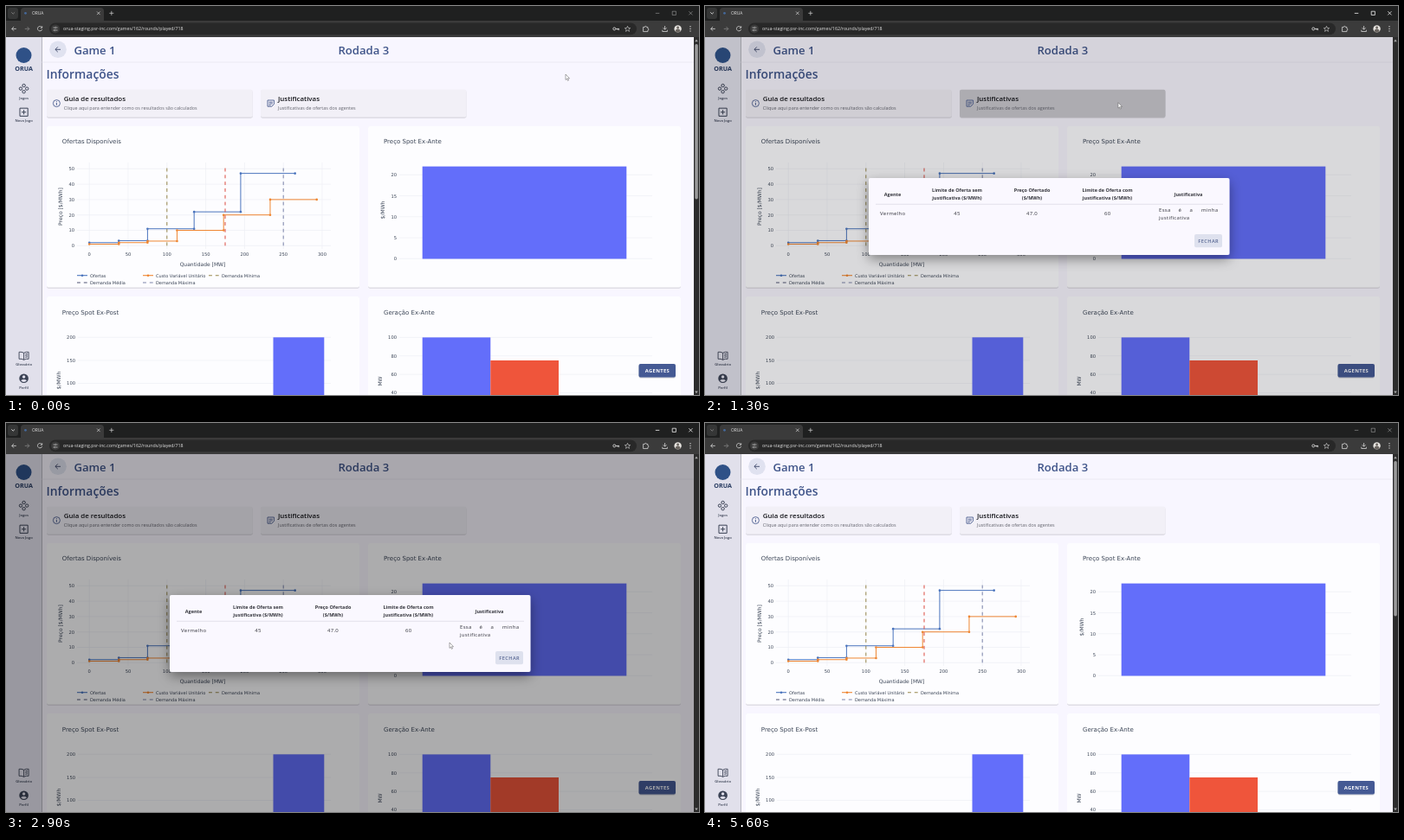
An HTML page that plays this animation: 800 by 450 pixels, repeating every 5.7 s.

```html
<!DOCTYPE html>
<html lang="pt">
<head>
<meta charset="utf-8">
<style>
html, body { margin: 0; width: 100%; height: 100%; overflow: hidden; background: #1f2020; }
svg { display: block; width: 800px; height: 450px; font-family: "Open Sans", "Noto Sans", sans-serif; }
.plot { font-family: "DejaVu Sans", sans-serif; fill: #3c4657; }
</style>
</head>
<body>
<svg id="stage" viewBox="0 0 800 450" xmlns="http://www.w3.org/2000/svg"></svg>
<script>
const LOOP = 5700, STEP = 100, TOP = 36;
const NAVY = '#3f5489', BAR = '#636efa', RED = '#ef553b', BLUE = '#4a74bd', ORANGE = '#ef8632';

const rect = (x, y, x2, y2, fill, r = 0, more = '') =>
  `<rect x="${x}" y="${y}" width="${x2 - x}" height="${y2 - y}" rx="${r}" fill="${fill}" ${more}/>`;
const path = (d, color, w = 1, more = '') =>
  `<path d="${d}" fill="none" stroke="${color}" stroke-width="${w}" ${more}/>`;
const dot = (x, y, r, fill, more = '') => `<circle cx="${x}" cy="${y}" r="${r}" fill="${fill}" ${more}/>`;
const ring = (x, y, r, color, w = 1) => dot(x, y, r, 'none', `stroke="${color}" stroke-width="${w}"`);
// Text placed by the middle of its capitals
const text = (x, y, size, str, fill, more = '') =>
  `<text x="${x}" y="${y + size * .36}" font-size="${size}" fill="${fill}" ${more}>${str}</text>`;
const label = (x, y, size, str, more = '') =>
  `<text class="plot" x="${x}" y="${y + size * .36}" font-size="${size}" ${more}>${str}</text>`;
const MID = 'text-anchor="middle"', END = 'text-anchor="end"', SEMI = 'font-weight="600"', BOLD = 'font-weight="700"';
const upright = (x, y, str, size = 6) => label(x, y, size, str, `${MID} transform="rotate(-90 ${x} ${y})"`);

function browser() {
  const ink = '#d6d6d6';
  return rect(0, 0, 800, 18, '#1f2020') + rect(0, 17, 800, TOP, '#3b3b3b') +
    rect(2, 2, 14, 15, '#353636', 3) + rect(17, 2, 113, 20, '#3b3b3b', 4) +
    dot(22.5, 8.3, 1.4, '#45699a') + text(30, 8.4, 4.9, 'ORUA', '#e2e2e2') +
    path('M105 6.5l3.6 3.6m0-3.6l-3.6 3.6M119.3 8.3h5m-2.5-2.5v5', ink, .7) +
    `<g id="controls">${path('M6.3 7.3l1.9 1.9l1.9-1.9M749.8 8.4h4.5M769.2 6.2h4.2v4.2h-4.2zM788.3 6.2l4.2 4.2m0-4.2l-4.2 4.2', '#f0f0f0', .8)}</g>` +
    rect(50, 19.5, 728, 33.3, '#282828', 6.9) + dot(57, 26.4, 5, '#3b3b3b') +
    path('M11.8 26.4h-5m2.3-2.4l-2.4 2.4l2.4 2.4M41.5 24.8a2.7 2.7 0 1 0 .2 2.3m0-3.8v2h-2', ink, .8) +
    path('M21.8 26.4h5m-2.3-2.4l2.4 2.4l-2.4 2.4', '#858585', .8) +
    path('M54.5 25h2m2 0h1M54.5 28h1m2 0h2', ink, .7) + ring(57.4, 25, .8, ink, .5) + ring(56.4, 28, .8, ink, .5) +
    text(66, 26.3, 5.28, 'orua-staging.psr-inc.com/games/162/rounds/played/718', '#e0e0e0') +
    ring(702.3, 26.4, 1.5, ink, .9) + path('M704 26.4h4m-.7 0v1.8m-1.5-1.8v1.3', ink, .9) +
    path('M717.5 23.3l.9 2.1l2.3.2l-1.8 1.5l.6 2.3l-2-1.3l-2 1.3l.6-2.3l-1.8-1.5l2.3-.2z', ink, .6) +
    path('M735.6 24.4h1.8a1 1 0 0 1 2 0h1.5v1.7a1 1 0 0 1 0 2v1.5h-5.3z', ink, .8) +
    path('M760.6 23v4.2m-2-2l2 2l2-2M757.8 27.7v1.8h5.6v-1.8', ink, .8) +
    dot(775.6, 26.4, 4.2, '#e6e3df') + dot(775.6, 25, 1.4, '#69645f') +
    `<path d="M772.8 29.2a2.8 2.6 0 0 1 5.6 0a4.2 4.2 0 0 1-5.6 0z" fill="#69645f"/>` +
    [23.8, 26.4, 29].map(y => dot(790, y, .7, ink)).join('');
}

function sidebar() {
  const ink = '#3b4255', cap = (y, s) => text(20.6, y, 4.2, s, ink, `${MID} ${SEMI}`);
  return rect(0, TOP, 41.5, 450, '#e1e0eb') + dot(20.5, 57, 9, '#2f5187') +
    text(20.6, 72, 7.2, 'ORUA', '#26395f', `${MID} ${BOLD}`) +
    [[20.6, 92], [20.6, 99.2], [17, 95.6], [24.2, 95.6]].map(([x, y]) => ring(x, y, 1.7, ink, 1)).join('') +
    cap(106.7, 'Jogos') +
    path('M16 118.2h9.2v9.2h-9.2zM18 122.8h5.2m-2.6-2.6v5.2', ink) + cap(132, 'Novo Jogo') +
    path('M20.6 401.3q-2.5-1.5-5.5-1v8q3-.5 5.5 1q2.5-1.5 5.5-1v-8q-3-.5-5.5 1v8M22.3 402.8l2.5-.6m-2.5 2.4l2.5-.6m-2.5 2.4l2.5-.6', ink, .9) +
    cap(414.6, 'Glossário') + dot(20.6, 430.8, 5.3, ink) + dot(20.6, 429, 1.7, '#e1e0eb') +
    `<path d="M17.2 433.2a4 2.4 0 0 1 6.8 0a4.2 4.2 0 0 1-6.8 0z" fill="#e1e0eb"/>` + cap(441.6, 'Perfil');
}

const card = (x, y, x2, y2, fill) => rect(x, y, x2, y2, fill, 2, 'filter="url(#soft)"');

function header() {
  const ink = '#4c5e90';
  return rect(41.5, TOP, 794, 450, '#f8f6ff') + path('M41.5 65H794', '#ebe9f3', 1) +
    dot(60, 50.3, 9.8, '#e0e2f0') + path('M63 50.3h-6m2.8-2.9l-2.9 2.9l2.9 2.9', '#3a4566', .9) +
    text(78.5, 51.3, 13.1, 'Game 1', NAVY, SEMI) + text(383.5, 51.3, 13.1, 'Rodada 3', NAVY, SEMI) +
    text(46.5, 79.2, 13.9, 'Informações', NAVY, SEMI) +
    card(47, 96.8, 284.7, 128.5, '#f2f0f7') + card(294, 96.8, 531.5, 128.5, '#f2f0f7') +
    rect(294, 96.8, 531.5, 128.7, '#000', 2, 'id="shade"') +
    ring(58.4, 112.6, 4, ink, .9) + path('M58.4 112v2.8m0-4.6v1', ink, 1) +
    path('M302 109h7.4v4.6l-2.6 2.6h-4.8zM303.5 111.2h4.4m-4.4 1.8h4.4m-4.4 1.8h2', ink, .9) +
    text(66.8, 107.5, 7.9, 'Guia de resultados', '#15161b', SEMI) +
    text(66.8, 118.4, 5.4, 'Clique aqui para entender como os resultados são calculados', '#62636d') +
    text(314, 107.5, 7.9, 'Justificativas', '#15161b', SEMI) +
    text(314, 118.4, 5.4, 'Justificativas de ofertas dos agentes', '#62636d');
}

const GRID = '#eef0f5';
const ticks = (x, x2, list) => list.map(([v, y]) =>
  path(`M${x} ${y}H${x2}`, GRID, .7) + label(x - 3, y + .1, 5.2, v, END)).join('');

function offers() {
  const X = q => 96.2 + q * .896, Y = p => 277.3 - p * 1.78;
  const steps = (qs, ps, color) => {
    const pts = ps.flatMap((p, i) => [[X(qs[i]), Y(p)], [X(qs[i + 1]), Y(p)]]);
    return path('M' + pts.join('L'), color, 1) + pts.map(([x, y]) => dot(x, y, 1.3, color)).join('');
  };
  const dash = 'stroke-dasharray="3.9"';
  const limit = (q, color) => path(`M${X(q)} ${Y(0)}V184.5`, color, 1, dash);
  const key = (x, y, str, color, dashed) =>
    path(`M${x} ${y}h12`, color, 1.1, dashed ? dash : '') + (dashed ? '' : dot(x + 6, y, 1.3, color)) + label(x + 15, y, 5, str);
  let s = ticks(82, 375, [0, 10, 20, 30, 40, 50].map(v => [v, Y(v)]));
  for (let q = 0; q <= 300; q += 50)
    s += path(`M${X(q)} 181V281`, GRID, .7) + label(X(q), 287.5, 5.2, q, MID);
  return s + label(64.8, 156.7, 7, 'Ofertas Disponíveis') +
    upright(62.5, 232, 'Preço [$/MWh]') + label(227, 298.5, 6, 'Quantidade [MW]', MID) +
    steps([0, 38, 75, 135, 195, 265], [2, 3.3, 11, 22, 47], BLUE) +
    steps([0, 38, 75, 113, 173, 233, 293], [1, 2, 3, 10, 20, 30], ORANGE) +
    limit(100, '#96864a') + limit(175, '#dc4a3f') + limit(250, '#7c84aa') +
    key(82, 311.7, 'Ofertas', BLUE) + key(158, 311.7, 'Custo Variável Unitário', ORANGE) +
    key(234, 311.7, 'Demanda Mínima', '#96864a', 1) +
    key(82, 320, 'Demanda Média', '#4e5273', 1) + key(158, 320, 'Demanda Máxima', '#7c84aa', 1);
}

function charts() {
  const white = '#fdfdff';
  return card(47, 139, 408, 325.6, white) + card(418, 139, 779, 325.6, white) +
    card(47, 336, 408, 460, white) + card(418, 336, 779, 460, white) + offers() +
    label(436, 156.7, 7, 'Preço Spot Ex-Ante') + upright(434.7, 236, '$/MWh') +
    ticks(454, 746, [0, 5, 10, 15, 20].map(v => [v, 292.3 - v * 4.85])) + rect(480.7, 185.6, 716.3, 292.5, BAR) +
    label(64.8, 354.3, 7, 'Preço Spot Ex-Post') + upright(61, 433, '$/MWh') +
    ticks(83, 375, [[200, 383.3], [150, 410], [100, 436.5]]) + rect(308.5, 383.3, 367.3, 450, BAR) +
    label(436, 354.3, 7, 'Geração Ex-Ante') + upright(432, 434, 'MW') +
    ticks(454, 746, [100, 80, 60, 40].map(v => [v, 490.2 - v * 1.068])) +
    rect(480.7, 383.4, 559.3, 450, BAR) + rect(559.3, 410, 638, 450, RED) +
    rect(730.5, 414, 773, 429.5, '#455a94', 2, 'filter="url(#soft)"') +
    text(752, 422, 5.8, 'AGENTES', '#fff', `${MID} ${BOLD} letter-spacing=".35"`);
}

function dialog() {
  const ink = '#33343b', head = (x, y, s) => text(x, y, 5.5, s, ink, `${MID} ${BOLD}`);
  const cell = (x, y, s, more = '') => text(x, y, 6, s, ink, `letter-spacing=".3" ${more}`);
  return rect(189, 199, 605.5, 288, '#faf8ff', 2, 'filter="url(#deep)"') + path('M197 229.3H598', '#dddbe6', .8) +
    head(216.5, 217.7, 'Agente') +
    head(291, 213, 'Limite de Oferta sem') + head(291, 222, 'justificativa ($/MWh)') +
    head(377.5, 213, 'Preço Ofertado') + head(377.5, 222, '($/MWh)') +
    head(464.5, 213, 'Limite de Oferta com') + head(464.5, 222, 'justificativa ($/MWh)') +
    head(558, 217.7, 'Justificativa') +
    cell(202, 240.2, 'Vermelho') + cell(291, 240.2, '45', MID) + cell(377.5, 240.2, '47.0', MID) + cell(464.7, 240.2, '60', MID) +
    cell(524, 235.4, 'Essa') + cell(546.5, 235.4, 'é') + cell(559.5, 235.4, 'a') + cell(592.3, 235.4, 'minha', END) +
    cell(524, 245.2, 'justificativa') +
    rect(565, 264, 597, 279.2, '#dee1ee', 2) +
    `<clipPath id="btn">${rect(565, 264, 597, 279.2, '#000', 2)}</clipPath>` +
    dot(574, 271.5, 0, '#7f89ab', 'id="ripple" clip-path="url(#btn)"') +
    text(581.2, 271.7, 5.6, 'FECHAR', '#586793', `${MID} ${SEMI} letter-spacing=".45"`);
}

const stage = document.getElementById('stage');
stage.innerHTML = `<defs>
  <filter id="soft" x="-10%" y="-10%" width="120%" height="130%"><feDropShadow dx="0" dy=".8" stdDeviation=".5" flood-color="#000" flood-opacity=".25"/></filter>
  <filter id="deep" x="-20%" y="-40%" width="140%" height="200%"><feDropShadow dx="0" dy="5" stdDeviation="7" flood-color="#000" flood-opacity=".4"/></filter>
  </defs>` + header() + charts() + sidebar() + rect(0, TOP, 794, 450, '#000', 0, 'id="dim"') +
  rect(794, TOP, 800, 450, '#2c2c2c') + rect(795.3, 44, 798.8, 223.5, '#9b9b9b', 1.7, 'id="thumb"') +
  '<path d="M795.2 41.2l1.8-2.6l1.8 2.6zM795.2 445.6l1.8 2.6l1.8-2.6z" fill="#a5a5a5"/>' +
  `<g id="dialog">${dialog()}</g>` + browser() +
  `<g id="cursor" stroke="#555" stroke-width=".5" fill="#fff">
    <path id="arrow" d="M0 0v6.4l1.5-1.3l1 2.3l1-.5l-1-2.2h2z"/>
    <path id="hand" d="M-.7 .6q.7-1.1 1.4 0v3l2.9 .7q1.2 .4 .9 1.7l-.6 2.5h-3.7l-2.5-3q.3-.9 1.6 0z"/>
  </g>`;

const ids = ['shade', 'dim', 'thumb', 'dialog', 'ripple', 'controls', 'cursor', 'arrow', 'hand'];
const ui = Object.fromEntries(ids.map(id => [id, document.getElementById(id)]));
const span = (t, a, b) => Math.max(0, Math.min(1, (t - a) / (b - a)));
const show = (node, on) => node.setAttribute('visibility', on ? 'visible' : 'hidden');
const fade = (node, o) => node.setAttribute('opacity', o);

// time, x, y of the pointer's tip
const route = [[100, 646, 79], [600, 480, 112], [1200, 477, 111], [1700, 477, 118], [1900, 477, 118],
  [2400, 467, 238], [2900, 512, 254], [3600, 567.5, 274], [5700, 567.5, 274]];
function pointer(t) {
  const i = Math.max(1, route.findIndex(k => k[0] >= t));
  const [a, x, y] = route[i - 1], [b, x2, y2] = route[i];
  const u = span(t, a, b), e = u * u * (3 - 2 * u);
  return [x + (x2 - x) * e, y + (y2 - y) * e];
}

function draw(t) {
  const rise = 1 - (1 - span(t, 1200, 1600)) ** 2;
  fade(ui.dim, .32 * rise * (1 - span(t, 4400, 4800)));
  fade(ui.shade, t < 1300 ? .06 * span(t, 400, 600) + .22 * span(t, 800, 1100) : .17 * (1 - span(t, 1300, 1600)));
  fade(ui.dialog, span(t, 1000, 1200) * (1 - span(t, 4400, 4600)));
  show(ui.thumb, t < 1100 || t >= 4700);
  ui.ripple.setAttribute('r', 32 * span(t, 4200, 4500));
  fade(ui.ripple, .4);
  fade(ui.controls, t >= 800 && t < 5600 ? 1 : .45);
  ui.cursor.setAttribute('transform', `translate(${pointer(t)})`);
  const hand = t >= 3500, seen = t < 4800;
  show(ui.arrow, seen && !hand);
  show(ui.hand, seen && hand);
}

function tick() {
  draw(Math.floor(performance.now() % LOOP / STEP) * STEP);
  requestAnimationFrame(tick);
}
tick();
</script>
</body>
</html>
```
